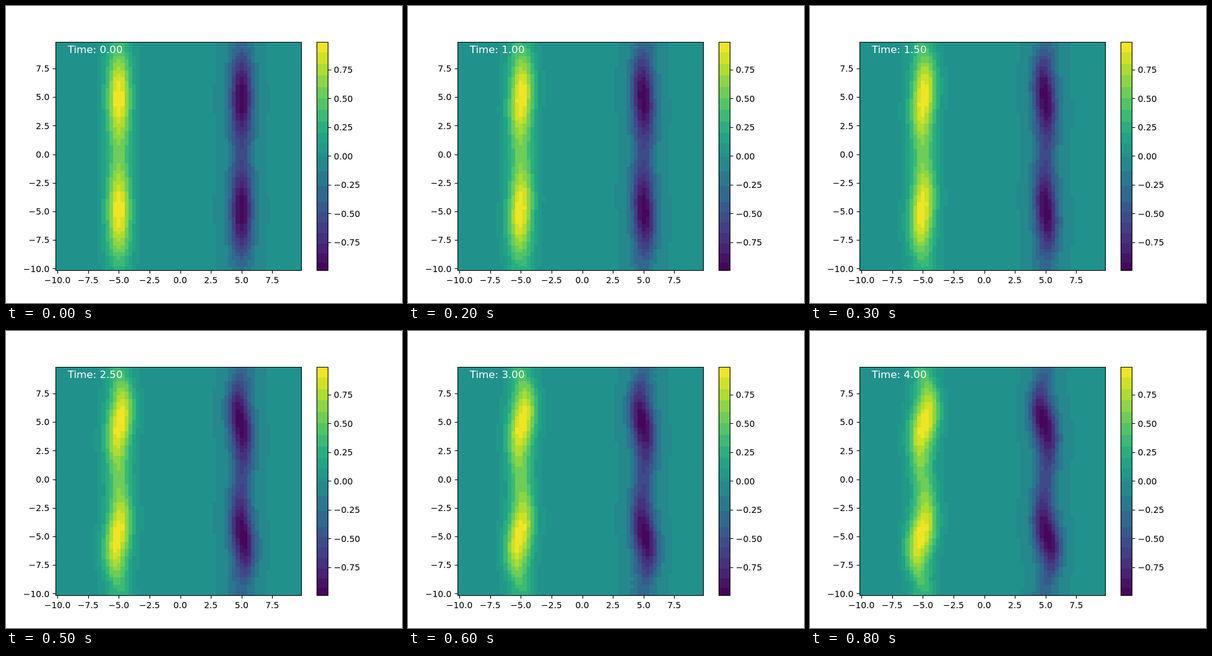
An HTML page with a canvas for the animation above (900 ms loop, 640 by 480 pixels).

```html
<!DOCTYPE html>
<html lang="en">
<head>
<meta charset="utf-8">
<title>Vorticity</title>
<style>
html, body { margin: 0; width: 100%; height: 100%; overflow: hidden; background: #fff; }
canvas, svg { position: absolute; left: 0; top: 0; width: 640px; height: 480px; }
text { font-family: "DejaVu Sans", sans-serif; font-size: 13.89px; }
</style>
</head>
<body>
<canvas id="field" width="640" height="480"></canvas>
<svg id="axes" viewBox="0 0 640 480"></svg>
<script>
const N = 64, L = 20, H = L / N, NU = 0.001;
const FRAMES = 9, STEP_MS = 100;
const BOX = { x: 80, y: 57.6, w: 396.8, h: 369.6 };
const BAR = { x: 501.6, w: 18.48 };
const VMAX = 0.994;

// --- colours: viridis reduced to a few bands ---
const VIRIDIS = ['440154', '482475', '414487', '355f8d', '2a788e', '21918c',
  '22a884', '44bf70', '7ad151', 'bddf26', 'fde725']
  .map(h => [0, 2, 4].map(i => parseInt(h.slice(i, i + 2), 16)));
const EDGES = [-VMAX, -0.93, -0.85, -0.76, -0.67, -0.58, -0.49, -0.4, -0.26, -0.135, -0.0078,
  0.03, 0.11, 0.2, 0.3, 0.4, 0.5, 0.6, 0.7, 0.8, 0.9, VMAX];

function viridis(v) {
  const p = (v / VMAX + 1) * 5, i = Math.min(9, Math.floor(p)), f = p - i;
  return `rgb(${VIRIDIS[i].map((c, k) => Math.round(c + (VIRIDIS[i + 1][k] - c) * f))})`;
}
const BANDS = EDGES.slice(1).map((e, i) =>
  e === 0.03 ? viridis(0) : viridis((e + EDGES[i]) / 2));

function bandOf(v) {
  let i = 0;
  while (i < BANDS.length - 1 && v >= EDGES[i + 1]) i++;
  return i;
}

// --- vorticity-streamfunction solver on a periodic grid ---
function fft(re, im, o, s) {
  for (let i = 1, j = 0; i < N; i++) {
    let bit = N >> 1;
    for (; j & bit; bit >>= 1) j ^= bit;
    j ^= bit;
    if (i < j) {
      const a = o + i * s, b = o + j * s;
      [re[a], re[b]] = [re[b], re[a]];
      [im[a], im[b]] = [im[b], im[a]];
    }
  }
  for (let len = 2; len <= N; len *= 2) {
    const half = len / 2;
    for (let k = 0; k < half; k++) {
      const c = Math.cos(2 * Math.PI * k / len), d = -Math.sin(2 * Math.PI * k / len);
      for (let i = k; i < N; i += len) {
        const a = o + i * s, b = a + half * s;
        const x = re[b] * c - im[b] * d, y = re[b] * d + im[b] * c;
        re[b] = re[a] - x; im[b] = im[a] - y;
        re[a] += x; im[a] += y;
      }
    }
  }
}

function fft2(re, im) {
  for (let i = 0; i < N; i++) fft(re, im, i * N, 1);
  for (let i = 0; i < N; i++) fft(re, im, i, N);
}

const wave = i => (i < N / 2 ? i : i - N) * 2 * Math.PI / L;

function stream(w) {
  const re = Float64Array.from(w), im = new Float64Array(N * N);
  fft2(re, im);
  for (let j = 0; j < N; j++) for (let i = 0; i < N; i++) {
    const n = j * N + i, k2 = wave(i) ** 2 + wave(j) ** 2;
    const g = k2 ? -1 / (k2 * N * N) : 0;
    re[n] *= g;
    im[n] *= -g;
  }
  fft2(re, im);
  return re;
}

function rate(w) {
  const p = stream(w), out = new Float64Array(N * N);
  for (let j = 0; j < N; j++) for (let i = 0; i < N; i++) {
    const n = j * N + i;
    const e = j * N + (i + 1) % N, o = j * N + (i + N - 1) % N;
    const u = (j + 1) % N * N + i, d = (j + N - 1) % N * N + i;
    const adv = (p[e] - p[o]) * (w[u] - w[d]) - (p[u] - p[d]) * (w[e] - w[o]);
    const lap = w[e] + w[o] + w[u] + w[d] - 4 * w[n];
    out[n] = (adv / 4 + NU * lap) / (H * H);
  }
  return out;
}

function rk4(w, dt) {
  const add = (k, f) => w.map((v, n) => v + k[n] * f);
  const a = rate(w), b = rate(add(a, dt / 2)), c = rate(add(b, dt / 2)), d = rate(add(c, dt));
  return w.map((v, n) => v + dt / 6 * (a[n] + 2 * b[n] + 2 * c[n] + d[n]));
}

const blob = (x, y) => Math.exp(-x * x - y * y / 20);

function solve() {
  let w = new Float64Array(N * N);
  for (let j = 0; j < N; j++) for (let i = 0; i < N; i++) {
    const x = i * H - L / 2, y = j * H - L / 2;
    w[j * N + i] = blob(x + 5, y + 5) + blob(x + 5, y - 5) - blob(x - 5, y + 5) - blob(x - 5, y - 5);
  }
  const list = [w];
  while (list.length < FRAMES) list.push(w = rk4(rk4(w, 0.25), 0.25));
  return list;
}

// --- drawing ---
const ctx = document.getElementById('field').getContext('2d');
const svg = document.getElementById('axes');
const edgeX = i => Math.round(BOX.x + BOX.w * i / N);
const edgeY = j => Math.round(BOX.y + BOX.h * (1 - j / N));
const snap = v => Math.floor(v + 0.5) + 0.5;

function make(tag, attrs, content = '') {
  const el = document.createElementNS('http://www.w3.org/2000/svg', tag);
  for (const k in attrs) el.setAttribute(k, attrs[k]);
  el.textContent = content;
  return svg.appendChild(el);
}

const label = (x, y, anchor, v, digits) =>
  make('text', { x, y, 'text-anchor': anchor }, v.toFixed(digits).replace('-', '\u2212'));

function frame(x, y, w, h) {
  const l = snap(x), t = snap(y);
  return `M${l} ${t}H${snap(x + w)}V${snap(y + h)}H${l}Z`;
}

function drawAxes() {
  const bottom = BOX.y + BOX.h, barEnd = BAR.x + BAR.w;
  let d = frame(BOX.x, BOX.y, BOX.w, BOX.h) + frame(BAR.x, BOX.y, BAR.w, BOX.h);
  for (let v = -10; v <= 7.5; v += 2.5) {
    const f = (v + L / 2 + H / 2) / L;
    const x = BOX.x + BOX.w * f, y = bottom - BOX.h * f;
    d += `M${snap(x)} 428v4.5M80 ${snap(y)}h-4.5`;
    label(x, 447.6, 'middle', v, 1);
    label(70.3, y + 5.2, 'end', v, 1);
  }
  for (let v = -0.75; v <= 0.75; v += 0.25) {
    const y = BOX.y + BOX.h * (1 - v / VMAX) / 2;
    d += `M521 ${snap(y)}h4.5`;
    label(barEnd + 9.72, y + 5.2, 'start', v, 2);
  }
  make('path', { d, fill: 'none', stroke: '#000', 'stroke-width': 1.11 });
}

function drawBar() {
  const toY = v => Math.round(BOX.y + BOX.h * (1 - v / VMAX) / 2);
  BANDS.forEach((c, i) => {
    const top = toY(EDGES[i + 1]);
    ctx.fillStyle = c;
    ctx.fillRect(502, top, 18, toY(EDGES[i]) - top);
  });
}

function drawField(w) {
  for (let j = 0; j < N; j++) for (let i = 0; i < N; i++) {
    const x = edgeX(i), y = edgeY(j + 1);
    ctx.fillStyle = BANDS[bandOf(w[j * N + i])];
    ctx.fillRect(x, y, edgeX(i + 1) - x, edgeY(j) - y);
  }
}

const fields = solve();
drawBar();
drawAxes();
const clock = make('text', { x: 99.8, y: 76.1, fill: '#fff', style: 'font-size:16.67px' });
let shown = -1, start = null;

function render(ms) {
  const k = Math.floor(ms / STEP_MS) % FRAMES;
  if (k === shown) return;
  shown = k;
  drawField(fields[k]);
  clock.textContent = 'Time: ' + (k / 2).toFixed(2);
}

function tick(now) {
  if (start === null) start = now;
  render(now - start);
  requestAnimationFrame(tick);
}
render(0);
requestAnimationFrame(tick);
</script>
</body>
</html>
```
